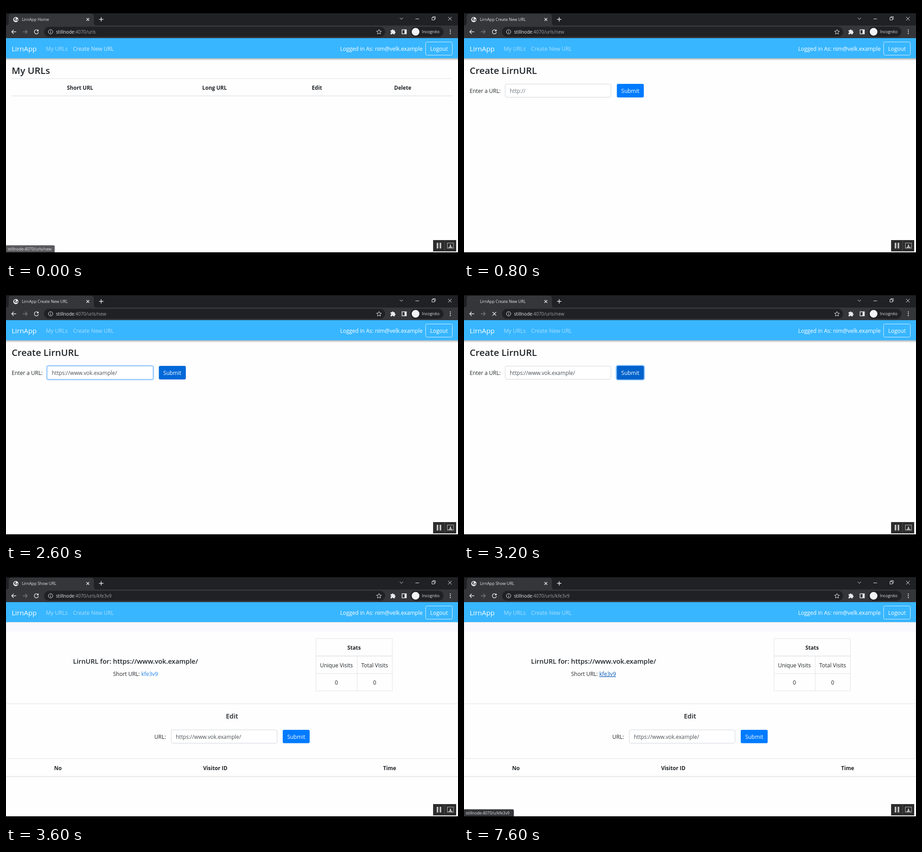
Animation, 998 px wide and 561 px high, one loop 8 s. Source, as an HTML page:

```html
<!DOCTYPE html>
<html lang="en">
<head>
<meta charset="utf-8">
<title>Link shortener demo</title>
<style>
  html, body { margin: 0; height: 100%; overflow: hidden; background: #000; }
  svg { display: block; width: 100vw; height: 100vh; }
  text { font: 12px "Open Sans", "Noto Sans", sans-serif; fill: #212529; white-space: pre; }
  .mid { text-anchor: middle; }
  .end { text-anchor: end; }
  .bar text { fill: #fff; }
  .bar .brand { font-size: 15.1px; }
  .bar .dim { fill: #a9dfff; }
  .small { font-size: 8.9px; fill: #e3e4e8; }
  .url { font-size: 10.15px; fill: #9aa0a6; }
  .url .host { fill: #e8eaed; }
  .h3 { font-size: 20.5px; font-weight: 600; }
  .h5 { font-size: 14.7px; font-weight: 600; }
  .th { font-size: 11.7px; font-weight: 700; }
  .field { font-size: 11.8px; fill: #495057; }
  .hint { fill: #6c757d; }
  .on { fill: #fff; }
  .input { fill: #fff; stroke: #ced4da; }
  .line { fill: none; stroke: #dee2e6; }
  .thick { stroke-width: 1.7; }
  .icon { fill: none; stroke: #e8eaed; stroke-width: 1.4; }
  .thin { stroke-width: 1; }
</style>
</head>
<body>
<svg viewBox="0 0 998 561">
  <defs>
    <linearGradient id="shade" x2="0" y2="1">
      <stop stop-opacity=".3"/><stop offset="1" stop-opacity="0"/>
    </linearGradient>
  </defs>
  <rect width="998" height="561"/>
  <rect y="71" width="998" height="473" fill="#fefefe"/>

  <!-- browser frame -->
  <rect y="16" width="998" height="27" fill="#1f2124"/>
  <path d="M0 43Q6 43 6 37V23Q6 17 12 17H188Q194 17 194 23V37Q194 43 200 43H998V71H0Z" fill="#35363a"/>
  <g id="favicon">
    <circle cx="21.7" cy="30" r="5.7" fill="#f1f3f4"/>
    <path d="M18 27.5l3-2 1.5 1.5-2 2 1.5 2-1 2.5-3-3ZM23 29.5l3-.5v3l-2.5 1.5Z" fill="#45474c"/>
  </g>
  <text id="title" class="small" x="35" y="33"></text>
  <path class="icon" d="M177.700 26.700l6 6m0-6l-6 6M205.500 29.500h9.500m-4.750-4.750v9.500"/>
  <path class="icon thin" d="M869.500 26l3.500 3.500 3.500-3.500M904 28.500h8M940.500 25.500h5.500v5.500h-5.500ZM942.500 25.500v-2h5.500v5.500h-2M976 24l8 8m0-8l-8 8"/>
  <path class="icon" d="M22.500 57H12.500m4.500-4.500l-4.500 4.500 4.500 4.500"/>
  <path class="icon" d="M37 57h10m-4.500-4.500l4.500 4.500-4.500 4.500" style="stroke:#77797d"/>
  <g id="reload">
    <path class="icon" d="M71 54.500A4.600 4.600 0 1 0 71.600 58"/>
    <path d="M72 51.500v4.500h-4.500Z" fill="#e8eaed"/>
  </g>
  <path id="stop" class="icon" d="M63 53l8 8m0-8l-8 8"/>
  <rect x="84" y="46" width="753" height="22" rx="11" fill="#202124"/>
  <circle class="icon thin" cx="98.500" cy="57" r="4.800"/>
  <path class="icon thin" d="M98.500 54v1.300m0 1.200v3.500"/>
  <text class="url" x="110.500" y="61"><tspan class="host">stillnode</tspan>:4070/<tspan id="path"></tspan></text>
  <path class="icon thin" d="M823.500 51.800l1.600 3.500 3.800.4-2.900 2.600.9 3.800-3.400-2-3.400 2 .9-3.800-2.900-2.600 3.800-.4Z"/>
  <path d="M849 53.500h3a1.700 1.700 0 0 1 3.400 0h3v3a1.700 1.700 0 0 1 0 3.400v2.600h-3.200a1.600 1.600 0 0 0-3.200 0h-3v-3.200a1.600 1.600 0 0 0 0-3.200Z" fill="#e8eaed"/>
  <path class="icon" d="M874.500 52.500h9.500v9h-9.500Z"/>
  <path d="M880 52h4v10h-4Z" fill="#e8eaed"/>
  <rect x="893" y="46" width="73" height="22" rx="11" fill="#202124"/>
  <circle cx="904.300" cy="57" r="8.500" fill="#f1f3f4"/>
  <text class="small" x="918.500" y="60.200">Incognito</text>
  <path d="M980 52h2v2h-2Zm0 4h2v2h-2Zm0 4h2v2h-2Z" fill="#e8eaed"/>

  <!-- navigation bar -->
  <rect id="shadow" y="115" width="998" height="6" fill="url(#shade)"/>
  <rect y="71" width="998" height="44.500" fill="#38b6ff"/>
  <g class="bar">
    <text class="brand" x="12.500" y="100">LirnApp</text>
    <text class="dim" x="88" y="99">My URLs</text>
    <text id="create" class="dim" x="148" y="99">Create New URL</text>
    <text class="end" x="920" y="99">Logged in As: nim@velk.example</text>
    <rect x="926.500" y="79.500" width="59" height="29" rx="3" fill="none" stroke="#d7f0ff"/>
    <text class="mid" x="956" y="99">Logout</text>
  </g>

  <g id="list">
    <text class="h3" x="12.500" y="149.500">My URLs</text>
    <path class="line" d="M13 160.500H985.500"/>
    <path class="line thick" d="M13 198.500H985.500"/>
    <g class="mid">
      <text class="th" x="163.500" y="185">Short URL</text>
      <text class="th" x="460.500" y="185">Long URL</text>
      <text class="th" x="686.500" y="185">Edit</text>
      <text class="th" x="876" y="185">Delete</text>
    </g>
  </g>

  <g id="form">
    <text class="h3" x="12.500" y="149.500">Create LirnURL</text>
    <text x="12.500" y="192">Enter a URL:</text>
    <rect id="inputRing" x="89.800" y="171.300" width="236" height="31.400" rx="4" fill="none" stroke="#b5d8ff" stroke-width="2.600"/>
    <rect id="input" class="input" x="91" y="172.500" width="233.500" height="29" rx="3"/>
    <text id="value" class="field" x="101" y="192"></text>
    <path id="caret" d="M101.500 181v14" stroke="#495057"/>
    <rect id="submitRing" x="336.300" y="171.300" width="61.900" height="31.400" rx="4" fill="none" stroke="#8cc4ff" stroke-width="2.600"/>
    <rect id="submit" x="337.500" y="172" width="59.500" height="30" rx="3"/>
    <text class="mid on" x="367.200" y="192">Submit</text>
  </g>

  <g id="show">
    <rect y="116" width="998" height="20" fill="#f8f8fd"/>
    <rect class="line" x=".500" y="115.500" width="997" height="180" rx="3"/>
    <rect class="line" x=".500" y="295.500" width="997" height="121" rx="3"/>
    <path class="line" d="M684.500 151.500h168.500v115.500h-168.500ZM684 228.500h169M775.500 190v77"/>
    <path class="line thick" d="M684 190H853M0 456H998"/>
    <g class="mid">
      <text class="h5" x="286" y="207">LirnURL for: https://www.vok.example/</text>
      <text x="286" y="234">Short URL: <tspan id="link">kfe3v9</tspan></text>
      <text class="th" x="768.500" y="176">Stats</text>
      <text x="729.500" y="215">Unique Visits</text>
      <text x="814" y="215">Total Visits</text>
      <text x="729.500" y="252.500">0</text>
      <text x="814" y="252.500">0</text>
      <text class="h5" x="499" y="328">Edit</text>
      <text class="th" x="114.500" y="441.500">No</text>
      <text class="th" x="462" y="441.500">Visitor ID</text>
      <text class="th" x="847" y="441.500">Time</text>
    </g>
    <text x="327.500" y="372.500">URL:</text>
    <rect class="input" x="365" y="353" width="233.500" height="29.500" rx="3"/>
    <text class="field" x="375" y="372.500">https://www.vok.example/</text>
    <rect x="611" y="353" width="59.500" height="29.500" rx="3" fill="#007bff"/>
    <text class="mid on" x="640.800" y="372.500">Submit</text>
  </g>

  <!-- status bubble and recorder controls -->
  <g id="status">
    <path id="bubble" fill="#35363a"/>
    <text id="target" class="small" x="3.500" y="540"></text>
  </g>
  <rect x="943" y="517" width="51" height="25" fill="#2d2d2d"/>
  <path d="M968.500 517v25" stroke="#4a4a4a"/>
  <path d="M951 523h3.500v12.500h-3.500ZM957.500 523h3.500v12.500h-3.500Z" fill="#c4c4c4"/>
  <rect x="974.500" y="523.500" width="13.500" height="11.500" fill="none" stroke="#bbb"/>
  <path d="M976 534l4-3v-3q1.300-3 2.600 0v3l4 3Z" fill="#c4c4c4"/>
</svg>
<script>
  const $ = id => document.getElementById(id);
  const show = (id, on) => { $(id).style.display = on ? '' : 'none'; };
  const write = (id, text) => { if ($(id).textContent !== text) $(id).textContent = text; };
  const within = (t, from, to) => t >= from && t < to;

  function statusOpacity(t) {
    if (t < 200) return .82;
    if (t < 600) return 1;
    if (t < 800) return .5;
    if (t < 7400) return 0;
    return t < 7600 ? .82 : 1;
  }

  function draw(t) {
    const page = t < 400 ? 'list' : t < 3400 ? 'form' : 'show';
    const loading = within(t, 3200, 3400);
    const focused = within(t, 1000, 3200);
    const filled = t >= 2000;
    const hover = t >= 7000;

    for (const name of ['list', 'form', 'show']) show(name, name === page);
    write('title', 'LirnApp ' + { list: 'Home', form: 'Create New URL', show: 'Show URL' }[page]);
    write('path', { list: 'urls', form: 'urls/new', show: 'urls/kfe3v9' }[page]);
    show('favicon', !loading);
    show('reload', !loading);
    show('stop', loading);
    show('shadow', page !== 'show');
    $('create').style.fill = page === 'list' ? '#d2eeff' : '';

    write('value', filled ? 'https://www.vok.example/' : 'http://');
    $('value').classList.toggle('hint', !filled);
    show('caret', within(t, 1000, 1400));
    show('inputRing', focused);
    $('input').style.stroke = focused ? '#80bdff' : '';
    show('submitRing', loading);
    $('submit').style.fill = loading ? '#0062cc' : t >= 2600 ? '#0069d9' : '#007bff';

    $('link').style.fill = hover ? '#0056b3' : '#1a7fe8';
    $('link').style.textDecoration = hover ? 'underline' : 'none';

    const edge = page === 'show' ? 110 : 107.5;
    $('bubble').setAttribute('d', `M0 528.500H${edge - 3}q3 0 3 3V544H0Z`);
    write('target', 'stillnode:4070/' + (page === 'show' ? 'u/kfe3v9' : 'urls/new'));
    $('status').style.opacity = statusOpacity(t);
  }

  const start = performance.now();
  function tick() {
    draw((performance.now() - start) % 8000);
    requestAnimationFrame(tick);
  }
  tick();
</script>
</body>
</html>
```
